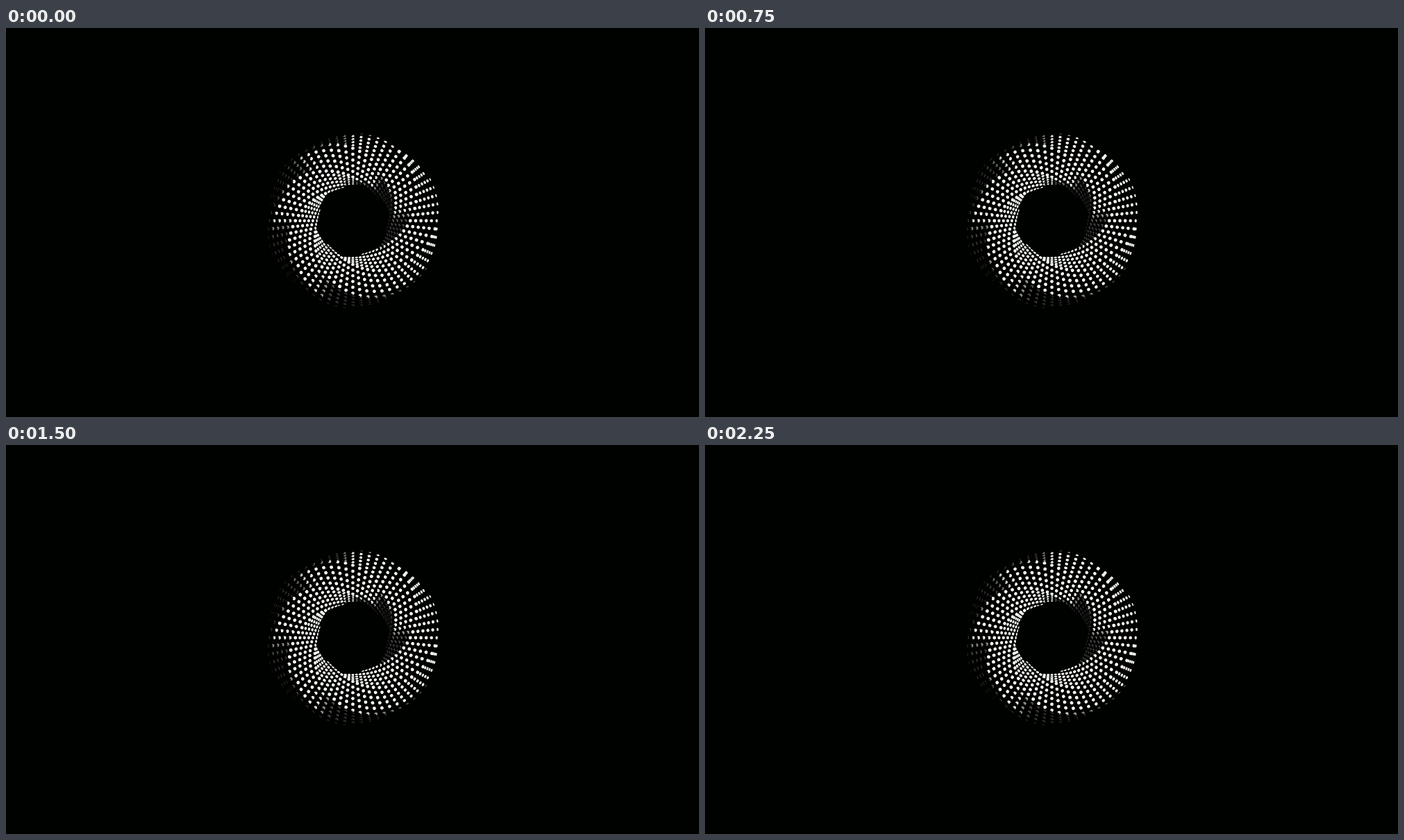
Write an HTML page with a canvas that moves like this. It is 998 by 561 pixels and loops after 2.28 s.

```html
<!DOCTYPE html>
<html lang="en">
<head>
<meta charset="utf-8">
<title>Twisting ring</title>
<style>
html, body { margin: 0; width: 100%; height: 100%; overflow: hidden; background: #000200; }
canvas { display: block; }
</style>
</head>
<body>
<canvas id="stage" width="998" height="561"></canvas>
<script>
const ctx = document.getElementById('stage').getContext('2d');
const TAU = Math.PI * 2;
const LOOP = 2280, STEP = 30, TURN = 2250;
const BACK = '#000200';
const CENTER = { x: 499.5, y: 278 };
const RING = 87, TUBE = 36.5, CAMERA = 320;
const SECTIONS = 64, SIDES = 6, PER_SIDE = 5;
const TWIST_START = -9 * Math.PI / 180;
const DOT = 2.15;
const LAMP = [130, -50, 105];

const dot3 = (a, b) => a[0] * b[0] + a[1] * b[1] + a[2] * b[2];
const unit = v => v.map(c => c / Math.hypot(...v));
const toward = (from, to) => unit(to.map((c, i) => c - from[i]));
const clamp = (v, lo, hi) => Math.min(hi, Math.max(lo, v));

// Points along the hexagonal outline, with the direction each one faces
const outline = [];
for (let side = 0; side < SIDES; side++) {
  const a = side * TAU / SIDES, b = a + TAU / SIDES;
  for (let j = 0; j < PER_SIDE; j++) {
    const k = j / PER_SIDE;
    const x = Math.cos(a) * (1 - k) + Math.cos(b) * k;
    const y = Math.sin(a) * (1 - k) + Math.sin(b) * k;
    outline.push({
      radius: TUBE * Math.hypot(x, y),
      angle: Math.atan2(y, x),
      facing: j ? (a + b) / 2 : a
    });
  }
}

function drawDot(x, y, scale, normal, facing, ray) {
  const light = dot3(normal, ray);
  const level = clamp(0.3 + 4 * light, 0.3 * clamp(1 + light * 1.2, 0, 1), 1);
  const size = DOT * scale;
  const flat = size * clamp(0.3 + 0.75 * facing, 0.38, 1);
  const tilt = Math.atan2(normal[1], normal[0]);
  ctx.fillStyle = `rgba(248,252,244,${level})`;
  ctx.beginPath();
  ctx.ellipse(x, y, flat, size, tilt, 0, TAU);
  ctx.fill();
  // The unlit part leaves a crescent where light only grazes the surface
  const shade = clamp(0.6 - light * 2, 0, 0.9);
  if (shade > 0.05) {
    const shift = size * (1.7 - 1.2 * shade);
    const aim = Math.atan2(ray[1], ray[0]);
    ctx.fillStyle = BACK;
    ctx.beginPath();
    ctx.ellipse(x - Math.cos(aim) * shift, y - Math.sin(aim) * shift, flat, size, tilt, 0, TAU);
    ctx.fill();
  }
}

function draw(time) {
  const spin = time / TURN * TAU;
  ctx.fillStyle = BACK;
  ctx.fillRect(0, 0, 998, 561);
  for (let s = 0; s < SECTIONS; s++) {
    const around = s / SECTIONS * TAU;
    const cos = Math.cos(around), sin = Math.sin(around);
    const twist = around - spin + TWIST_START;
    for (const p of outline) {
      const angle = p.angle + twist, face = p.facing + twist;
      const reach = RING + p.radius * Math.cos(angle);
      const pos = [reach * cos, reach * sin, p.radius * Math.sin(angle)];
      const normal = [Math.cos(face) * cos, Math.cos(face) * sin, Math.sin(face)];
      const facing = dot3(normal, toward(pos, [0, 0, CAMERA]));
      if (facing <= 0) continue;
      const scale = CAMERA / (CAMERA - pos[2]);
      drawDot(CENTER.x + pos[0] * scale, CENTER.y + pos[1] * scale,
        scale, normal, facing, toward(pos, LAMP));
    }
  }
}

function frame() {
  draw(Math.floor(performance.now() % LOOP / STEP) * STEP);
  requestAnimationFrame(frame);
}
frame();
</script>
</body>
</html>
```
